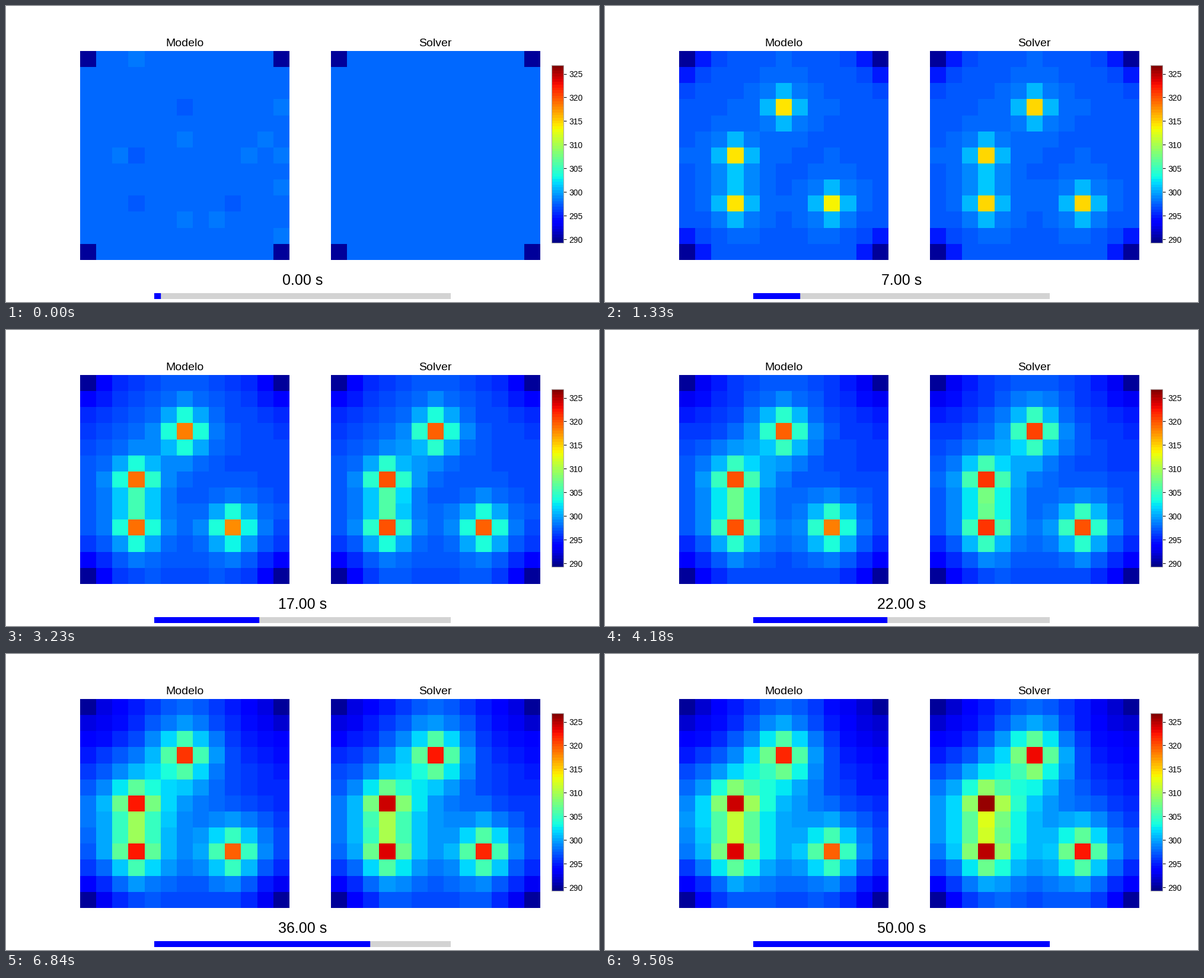
A matplotlib script for the animation above (9690 ms loop, 1000 by 500 pixels).

```python
import numpy as np
import matplotlib.pyplot as plt
from matplotlib.animation import FuncAnimation
from matplotlib.colors import ListedColormap
from matplotlib.patches import Rectangle

plt.rcParams["font.family"] = "Liberation Sans"

N, FRAMES, INTERVAL = 13, 51, 190
T_START, T_CORNER, T_ENV = 298.0, 290.0, 273.0
V_MIN, V_MAX = 289.25, 326.82
HEATERS = ([3, 6, 9, 9], [6, 3, 3, 9])     # rows, columns

# Thin plate: side 0.1 m, 1 mm thick, 15 W/(m K), emissivity 0.8 on both faces
STEP = 0.1 / (N - 1)
AREAL_CAPACITY = 2700 * 900 * 0.001
COND = 15 * 0.001 / (AREAL_CAPACITY * STEP**2)
RAD = 2 * 0.8 * 5.67e-8 / AREAL_CAPACITY
HEAT = 1 / (AREAL_CAPACITY * STEP**2)


def simulate(gain=1.0, fade=0.0, steps=10):
    """Plate temperatures at every whole second; the last heater may fade."""
    dt = 1 / steps
    power = np.full(4, HEAT * gain)
    temp = np.full((N, N), T_START)
    temp[::N - 1, ::N - 1] = T_CORNER
    history = [temp]
    for sec in range(FRAMES - 1):
        power[-1] = HEAT * (gain - fade * sec)
        for _ in range(steps):
            p = np.pad(temp, 1, mode="edge")
            flow = p[2:, 1:-1] + p[:-2, 1:-1] + p[1:-1, 2:] + p[1:-1, :-2] - 4 * temp
            rate = COND * flow - RAD * (temp**4 - T_ENV**4)
            rate[HEATERS] += power
            temp = temp + dt * rate
            temp[::N - 1, ::N - 1] = T_CORNER
        history.append(temp)
    return np.array(history)


solver = simulate()
model = simulate(gain=0.955, fade=0.0015)

# The model's starting field is slightly uneven
rng = np.random.default_rng(4)
warm = rng.random((N, N)) < 0.09
warm[::N - 1, ::N - 1] = False
model[0][warm] += 0.4
model[0][HEATERS] = T_START - 0.8

jet = ListedColormap(plt.get_cmap("jet")((np.arange(64) + 0.5) / 64))

fig, axes = plt.subplots(1, 2, figsize=(10, 5), dpi=100)
images = []
for ax, title, data in zip(axes, ("Modelo", "Solver"), (model, solver)):
    images.append(ax.imshow(data[0], cmap=jet, vmin=V_MIN, vmax=V_MAX,
                            interpolation="nearest"))
    ax.set_title(title, fontsize=14)
    ax.axis("off")

cbar = fig.colorbar(images[1], cax=fig.add_axes([0.92, 0.2, 0.02, 0.6]))
cbar.set_ticks(range(290, 330, 5))
cbar.outline.set_edgecolor("darkgray")

clock = fig.text(0.5, 0.072, "", fontsize=18, ha="center", va="center")

track = fig.add_axes([0.25, 0.01, 0.5, 0.02], facecolor="lightgray")
track.set(xlim=(0, FRAMES), ylim=(0, 1), xticks=[], yticks=[])
track.spines[:].set_visible(False)
bar = track.add_patch(Rectangle((0, 0), 0, 1, color="blue", lw=1))


def update(i):
    images[0].set_data(model[i])
    images[1].set_data(solver[i])
    clock.set_text(f"{i:.2f} s")
    bar.set_width(i + 1)
    return *images, clock, bar


anim = FuncAnimation(fig, update, frames=FRAMES, interval=INTERVAL,
                     repeat=True, repeat_delay=0)
plt.show()
```
